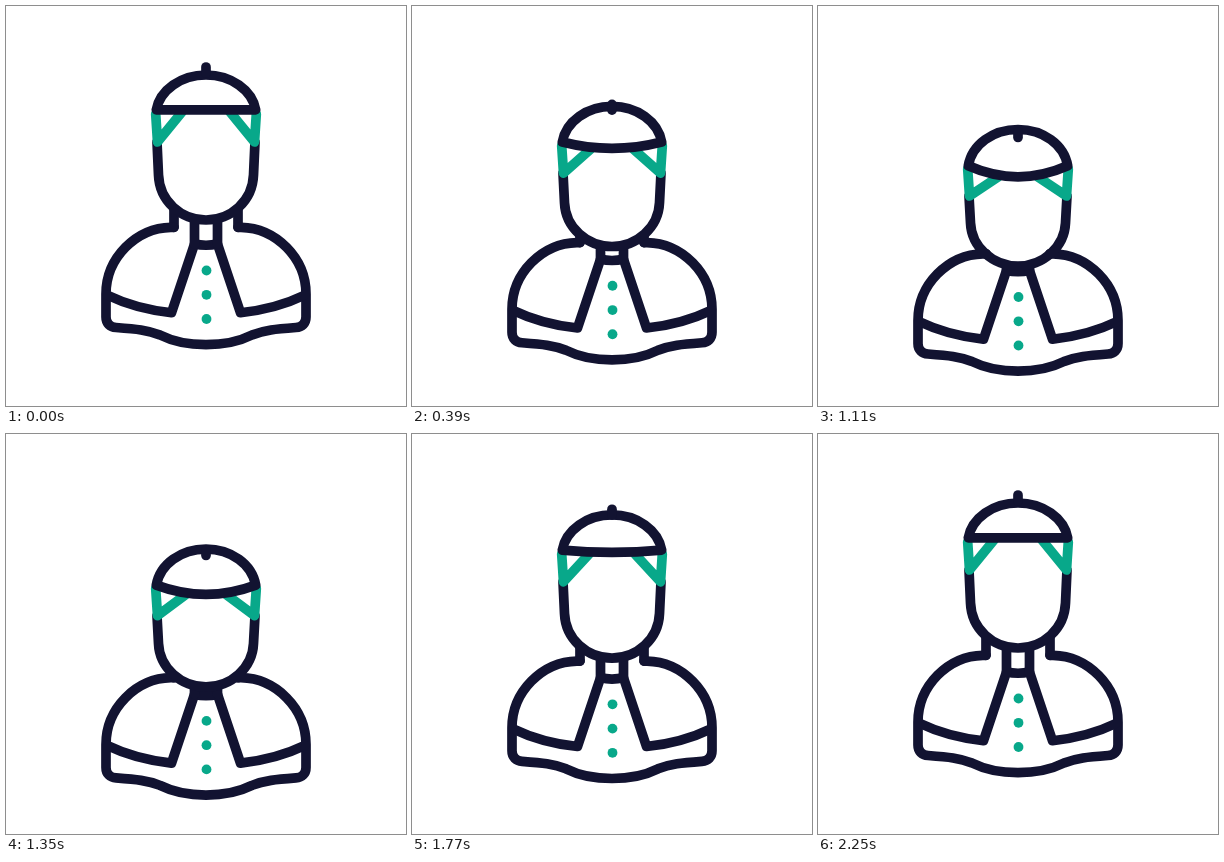
Animation, 400 px wide and 400 px high, one loop 2280 ms. Source, as an HTML page:

```html
<!DOCTYPE html>
<html lang="en">
<head>
<meta charset="utf-8">
<title>Nodding clergyman</title>
<style>
  html, body { margin: 0; width: 100%; height: 100%; overflow: hidden; background: #fff; }
  svg { display: block; width: 100%; height: 100%; }
  path { fill: none; stroke: #121331; stroke-width: 9.7; stroke-linecap: round; stroke-linejoin: round; }
  #hair { stroke: #08a88a; }
  circle { fill: #08a88a; }
</style>
</head>
<body>
<svg viewBox="0 0 400 400">
  <path id="neck"/>
  <g id="body">
    <path d="M168 221.3H165C130 222 100 252 100 288V311C100 317.500 104 321 110 321.500C130 323 142 324 154 329C166 335 183 338.700 200 338.700S234 335 246 329C258 324 270 323 290 321.500C296 321 300 317.500 300 311V288C300 252 270 222 235 221.300H232"/>
    <path d="M101 289Q130 303 165.500 306.700L188.500 238Q200 240.500 211.500 238L234.500 306.700Q270 303 299 289"/>
    <circle cx="200.5" cy="264.5" r="4.9"/>
    <circle cx="200.5" cy="288.800" r="4.9"/>
    <circle cx="200.5" cy="313" r="4.9"/>
  </g>
  <path id="collar"/>
  <path id="face"/>
  <path id="hair"/>
  <path id="hat"/>
  <path id="knob"/>
</svg>
<script>
const LOOP = 2280;
const el = id => document.getElementById(id);
const draw = (id, d) => el(id).setAttribute('d', d);
const clamp = x => Math.min(1, Math.max(0, x));

// cubic-bezier(a, 0, b, 1)
function ease(x, a, b) {
  let lo = 0, hi = 1;
  for (let i = 0; i < 24; i++) {
    const t = (lo + hi) / 2, s = 1 - t;
    if (3 * s * s * t * a + 3 * s * t * t * b + t * t * t < x) lo = t; else hi = t;
  }
  return lo * lo * (3 - 2 * lo);
}

function bow(ms) {
  return ms < 1110
    ? ease(clamp(ms / 840), 0.343, 0.45)
    : 1 - ease(clamp((ms - 1110) / 1140), 0.333, 0.4);
}

function render(ms) {
  const p = bow(ms);
  const body = 26.5 * p, chin = 46 * p, side = 54 * p, brim = 103.8 + 56 * p;

  el('body').setAttribute('transform', `translate(0 ${body})`);

  const neckEnd = 221.3 + body, neckTop = Math.min(204 + chin, neckEnd);
  draw('neck', `M168 ${neckTop}V${neckEnd}M232 ${neckTop}V${neckEnd}`);

  const collarTop = 214 + chin, collarEnd = 238 + body;
  draw('collar', `M188.5 ${collarTop}V${collarEnd}M211.5 ${collarTop}V${collarEnd}`);

  const ear = 136 + side, jaw = 169 + 48 * p, curve = 195 + chin, low = 214 + chin;
  draw('face', `M151 ${ear}L152.5 ${jaw}C153.5 ${curve} 175 ${low} 200 ${low}S246.5 ${curve} 247.5 ${jaw}L249 ${ear}`);

  const top = 108 + 55 * p, tipX = 24 - 4 * p, tipY = 106 + 65 * p;
  draw('hair', `M149.7 ${top}L151.5 ${ear}L${200 - tipX} ${tipY}M250.3 ${top}L248.5 ${ear}L${200 + tipX} ${tipY}`);

  const crown = 69 + 54.5 * p, dome = crown + 15;
  draw('hat', `M150.3 ${brim}C154 ${dome} 175 ${crown} 200 ${crown}S246 ${dome} 249.7 ${brim}Q200 ${brim + 22 * p} 150.3 ${brim}Z`);

  draw('knob', `M200 ${61 + 65 * p}V${67 + 64.5 * p}`);
}

function tick() {
  render(performance.now() % LOOP);
  requestAnimationFrame(tick);
}
tick();
</script>
</body>
</html>
```
